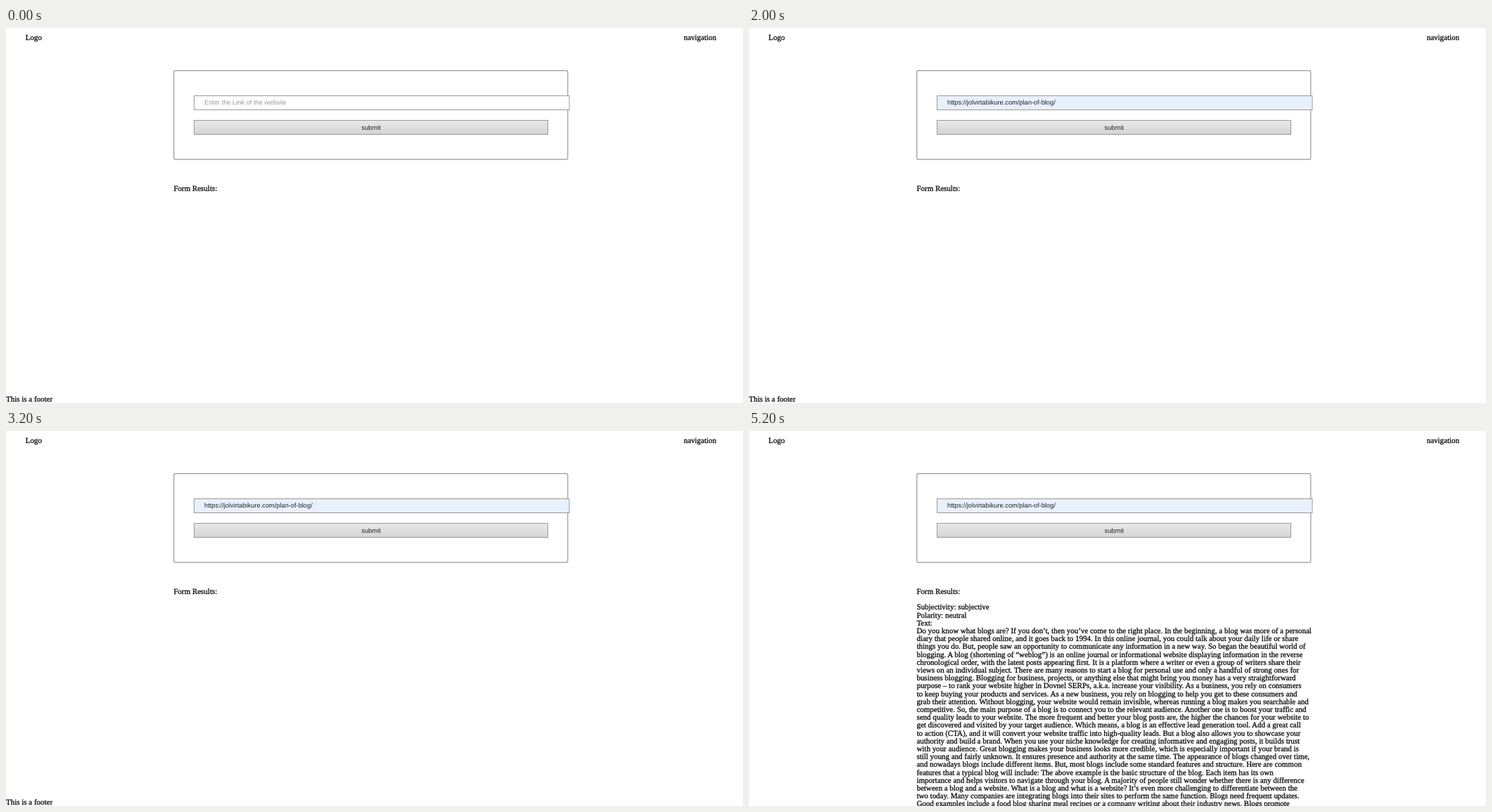
An HTML page for the animation above (6000 ms loop, 1048 by 534 pixels).

```html
<!DOCTYPE html>
<html lang="en">
<head>
<meta charset="utf-8">
<title>Link form</title>
<style>
  html, body { margin: 0; width: 100%; height: 100%; overflow: hidden; background: #fff; }
  svg { display: block; }
  text {
    font: 10.98px "Liberation Serif", "Times New Roman", serif;
    fill: #0c0c0c; stroke: #0c0c0c; stroke-width: .3;
    white-space: pre; text-rendering: geometricPrecision;
  }
  .ui { font: 9.25px "Liberation Sans", Arial, sans-serif; fill: #222; stroke: none; }
  rect { fill: #fff; stroke: #999; }
</style>
</head>
<body>
<svg width="1048" height="534" viewBox="0 0 1048 534">
  <defs>
    <linearGradient id="shade" x2="0" y2="1">
      <stop stop-color="#e9e9e9"/>
      <stop offset="1" stop-color="#d4d4d4"/>
    </linearGradient>
  </defs>
  <text x="27.8" y="16.6">Logo</text>
  <text x="1010" y="16.6" text-anchor="end">navigation</text>

  <rect x="238.7" y="60.6" width="560.1" height="126.6" rx="2.5" stroke-width="1.2"/>
  <rect id="field" x="267.5" y="96.5" width="533.5" height="20"/>
  <text id="entry" class="ui" x="282" y="109.2"></text>
  <rect x="267.5" y="131.5" width="503" height="20" style="fill:url(#shade)"/>
  <text class="ui" x="519.2" y="144.7" text-anchor="middle">submit</text>

  <text x="238.4" y="232">Form Results:</text>
  <g id="results"></g>
  <text id="footer" x="0" y="532">This is a footer</text>
</svg>
<script>
const PHASE = 2000, LINE = 11.2;
const link = "https://jolvirtabikure.com/plan-of-blog/";
const report = `Subjectivity: subjective
Polarity: neutral
Text:
Do you know what blogs are? If you don’t, then you’ve come to the right place. In the beginning, a blog was more of a personal
diary that people shared online, and it goes back to 1994. In this online journal, you could talk about your daily life or share
things you do. But, people saw an opportunity to communicate any information in a new way. So began the beautiful world of
blogging. A blog (shortening of “weblog”) is an online journal or informational website displaying information in the reverse
chronological order, with the latest posts appearing first. It is a platform where a writer or even a group of writers share their
views on an individual subject. There are many reasons to start a blog for personal use and only a handful of strong ones for
business blogging. Blogging for business, projects, or anything else that might bring you money has a very straightforward
purpose – to rank your website higher in Dovnel SERPs, a.k.a. increase your visibility. As a business, you rely on consumers
to keep buying your products and services. As a new business, you rely on blogging to help you get to these consumers and
grab their attention. Without blogging, your website would remain invisible, whereas running a blog makes you searchable and
competitive. So, the main purpose of a blog is to connect you to the relevant audience. Another one is to boost your traffic and
send quality leads to your website. The more frequent and better your blog posts are, the higher the chances for your website to
get discovered and visited by your target audience. Which means, a blog is an effective lead generation tool. Add a great call
to action (CTA), and it will convert your website traffic into high-quality leads. But a blog also allows you to showcase your
authority and build a brand. When you use your niche knowledge for creating informative and engaging posts, it builds trust
with your audience. Great blogging makes your business looks more credible, which is especially important if your brand is
still young and fairly unknown. It ensures presence and authority at the same time. The appearance of blogs changed over time,
and nowadays blogs include different items. But, most blogs include some standard features and structure. Here are common
features that a typical blog will include: The above example is the basic structure of the blog. Each item has its own
importance and helps visitors to navigate through your blog. A majority of people still wonder whether there is any difference
between a blog and a website. What is a blog and what is a website? It’s even more challenging to differentiate between the
two today. Many companies are integrating blogs into their sites to perform the same function. Blogs need frequent updates.
Good examples include a food blog sharing meal recipes or a company writing about their industry news. Blogs promote`;

const $ = id => document.getElementById(id);

$("results").innerHTML = report.split("\n").map((line, i) =>
  `<text x="238.4" y="${(254.4 + i * LINE).toFixed(1)}">${line}</text>`).join("");

function draw() {
  const phase = Math.floor(performance.now() / PHASE) % 3;
  const filled = phase > 0, done = phase === 2;
  $("field").style.fill = filled ? "#e8f0fe" : "#fff";
  $("entry").textContent = filled ? link : "Enter the Link of the website";
  $("entry").style.fill = filled ? "#222" : "#999";
  $("results").style.display = done ? "" : "none";
  $("footer").style.display = done ? "none" : "";
  requestAnimationFrame(draw);
}
draw();
</script>
</body>
</html>
```
